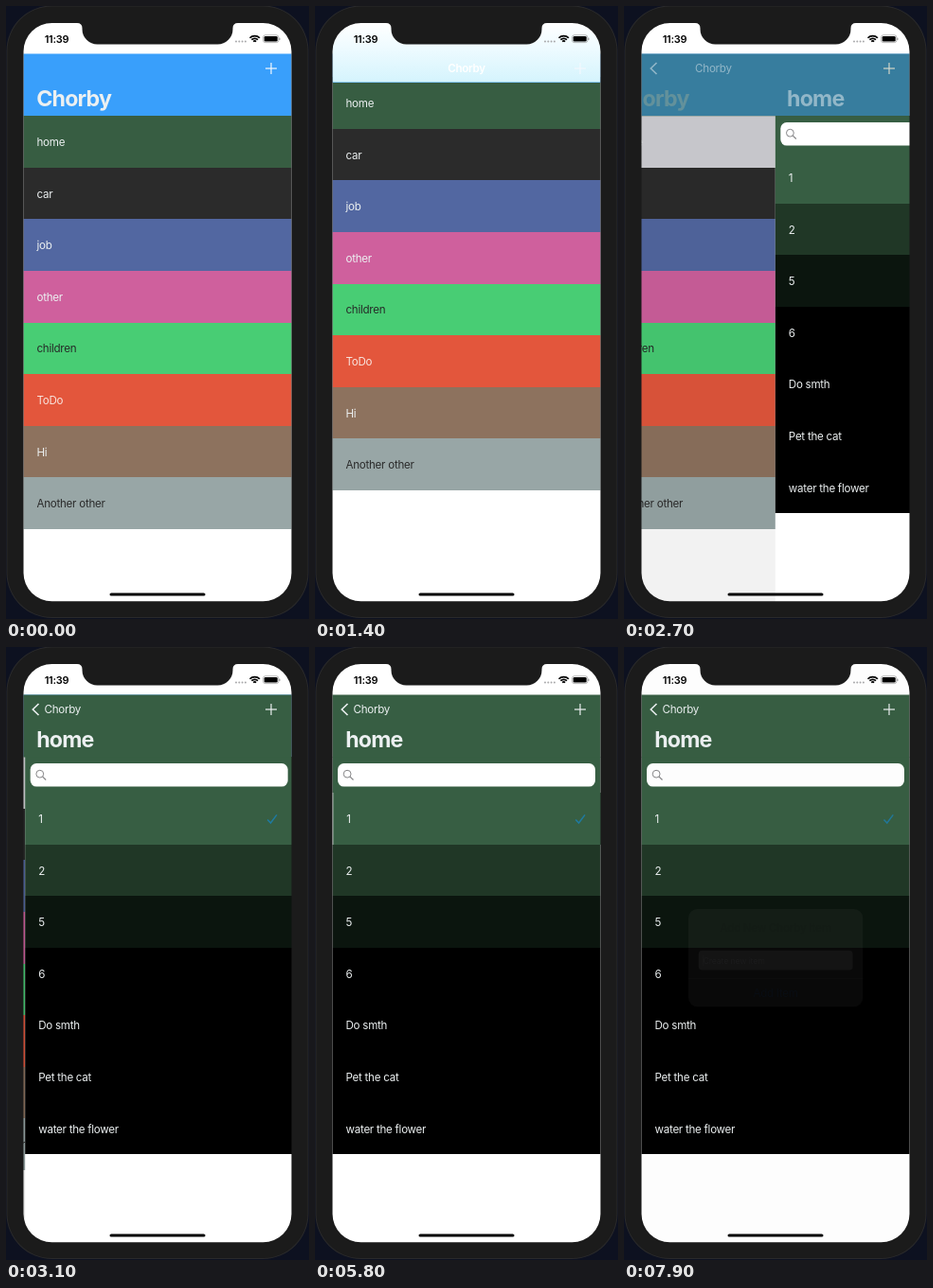
Recreate the animation shown at these times as an HTML page with a canvas. Size 320 by 648 pixels, loop 8 s.

```html
<!DOCTYPE html>
<html lang="en">
<head>
<meta charset="utf-8">
<title>To-do list demo</title>
<style>
html, body { margin: 0; width: 100%; height: 100%; overflow: hidden; background: #0d1120; }
canvas { display: block; width: 320px; height: 648px; }
</style>
</head>
<body>
<canvas id="stage"></canvas>
<script>
const LOOP = 8000, LEFT = 18.5, WIDTH = 283, ROW = 54.6;
const APP = 'Chorby', PALE = '#ecf0f1', GREEN = '#375e43';
const canvas = document.getElementById('stage');
const ctx = canvas.getContext('2d');
const ratio = window.devicePixelRatio || 1;
canvas.width = 320 * ratio;
canvas.height = 648 * ratio;

const lists = [
  ['home', '#375d42'], ['car', '#2b2b2b'], ['job', '#5267a1'], ['other', '#cf609d'],
  ['children', '#48cd74', '#262b28'], ['ToDo', '#e3563c', '#f8e4de'],
  ['Hi', '#8d725e'], ['Another other', '#98a6a6', '#2b2b2b']
];
const items = [
  ['1', GREEN], ['2', '#203726'], ['5', '#0b150e'], ['6', '#000'],
  ['Do smth', '#000'], ['Pet the cat', '#000'], ['water the flower', '#000']
];
const scrollKeys = [[250, 0], [900, 58], [1400, 41], [1850, -28], [2250, 0]];
const swipeKeys = [[4820, 0], [5200, -76], [5420, -66], [5790, 0.8], [6000, 0]];

const clamp = v => Math.max(0, Math.min(1, v));
const mix = (a, b, k) => a + (b - a) * k;

// Critically damped approach from 0 to 1
function spring(t, start, tau) {
  const u = Math.max(0, (t - start) / tau);
  return 1 - (1 + u) * Math.exp(-u);
}

function track(keys, t) {
  if (t <= keys[0][0]) return keys[0][1];
  for (let i = 1; i < keys.length; i++) {
    const [t0, a] = keys[i - 1], [t1, b] = keys[i];
    if (t < t1) return mix(a, b, (1 - Math.cos(Math.PI * (t - t0) / (t1 - t0))) / 2);
  }
  return keys[keys.length - 1][1];
}

function group(alpha, draw) {
  if (alpha <= 0) return;
  ctx.save();
  ctx.globalAlpha *= alpha;
  draw();
  ctx.restore();
}

function box(x, y, w, h, color, r = 0) {
  ctx.fillStyle = color;
  ctx.beginPath();
  ctx.roundRect(x, y, w, h, r);
  ctx.fill();
}

function line(color, width, points) {
  ctx.strokeStyle = color;
  ctx.lineWidth = width;
  ctx.beginPath();
  points.forEach(([x, y]) => ctx.lineTo(x, y));
  ctx.stroke();
}

// y is the middle of the capital letters
function text(str, x, y, color, size = 11.6, weight = 400, align = 'left') {
  ctx.font = `${weight} ${size}px Inter, Roboto, sans-serif`;
  ctx.letterSpacing = (size > 20 ? -0.035 : -0.023) * size + 'px';
  ctx.textAlign = align;
  ctx.fillStyle = color;
  ctx.fillText(str, x, y + size * 0.36);
}

function clipTo(x, y, w, h, draw) {
  ctx.save();
  ctx.beginPath();
  ctx.rect(x, y, w, h);
  ctx.clip();
  draw();
  ctx.restore();
}

// Row edges sit on whole pixels so that neighbours meet without a seam
function row([label, color, ink = PALE], x, y) {
  const edge = Math.round(y);
  box(x, edge, WIDTH, Math.round(y + ROW) - edge, color);
  text(label, x + 14, y + 27.6, ink);
}

function check(x, y, color) {
  line(color, 1.5, [[x - 5, y + 0.5], [x - 1.7, y + 4], [x + 4.8, y - 4.6]]);
}

function plus(color) {
  line(color, 1.2, [[274, 66], [286, 66]]);
  line(color, 1.2, [[280, 60], [280, 72]]);
}

function listTable(x, top, selected) {
  box(x, 50, WIDTH, 580, '#fff');
  lists.forEach((item, i) => row(i || !selected ? item : ['home', '#d1d1d6'], x, top + i * ROW));
}

function itemTable(t, x, alert) {
  box(x, 116, WIDTH, 514, '#fff');
  box(x, 116, WIDTH, 38, GREEN);
  box(x + 5.5, 123, 272, 24.6, '#fff', 6.5);
  ctx.strokeStyle = '#858587';
  ctx.lineWidth = 1;
  ctx.beginPath();
  ctx.arc(x + 15.6, 134.2, 3.9, 0, 7);
  ctx.stroke();
  line('#858587', 1.2, [[x + 18.5, 137.1], [x + 22, 140.5]]);

  const top = 154.2, swipe = track(swipeKeys, t);
  items.forEach((item, i) => {
    const y = top + i * ROW;
    if (i === 0 && swipe) {
      box(x, 154, WIDTH, 55, swipe < 0 ? '#ff3b30' : '#e4ebe6');
      if (swipe < 0) deleteAction(x + WIDTH + swipe, y);
    }
    row(item, x + (i ? 0 : swipe), y);
  });
  const mark = (cx, cy) => {
    group(1 - alert, () => check(cx, cy, '#1f7aa0'));
    group(alert, () => check(cx, cy, '#5d7d67'));
  };
  mark(x + 261 + swipe, 182);
  if (t >= 4100 && t < 4500) mark(x + 261, 236.6);
}

function deleteAction(x, y) {
  clipTo(x, y, 320, ROW, () => {
    const cx = x + 28;
    line('#fff', 1.3, [[cx - 7, y + 16], [cx + 7, y + 16]]);
    line('#fff', 1.3, [[cx - 2.5, y + 13.5], [cx + 2.5, y + 13.5]]);
    line('#fff', 1.3, [[cx - 5, y + 17], [cx - 4, y + 31], [cx + 4, y + 31], [cx + 5, y + 17]]);
    line('#fff', 1, [[cx, y + 19.5], [cx, y + 28.5]]);
    text('Delete', cx, y + 40, '#fff', 10.2, 400, 'center');
  });
}

function listBar(scroll, push) {
  const bottom = Math.max(80.5, 116.2 - scroll);
  const collapsed = clamp((scroll - 28) / 10);
  box(LEFT, 18, WIDTH, 32.5, '#fff');
  box(LEFT, 50.5, WIDTH, Math.round(bottom) - 50.5, '#399ffb');
  clipTo(LEFT, 78, WIDTH, bottom - 78, () => group(1 - push, () => {
    const size = 23.2 * (1 + Math.max(0, -scroll) * 0.001);
    text(APP, 32.2 - 85 * push, bottom - 18.5, PALE, size, 700);
  }));
  group(collapsed, () => {
    const fade = ctx.createLinearGradient(0, 18, 0, 80);
    fade.addColorStop(0, '#fff');
    fade.addColorStop(0.4, '#effbff');
    fade.addColorStop(1, '#d5f4fd');
    box(LEFT, 18, WIDTH, bottom - 18, fade);
    text(APP, 160, 66, '#fff', 11.6, 600, 'center');
  });
  plus('#f4f9fd');
}

function itemBar(push, alert) {
  const rest = 1 - Math.min(1, push * 1.01);
  group(1 - rest, () => {
    box(LEFT, 50.5, WIDTH, 66, GREEN);
    text('home', 32.2 + WIDTH * rest, 97.6, PALE, 23.2, 700);
    group(1 - 0.25 * alert, () => {
      line(PALE, 1.6, [[34.5, 60], [28.3, 66], [34.5, 72]]);
      text(APP, 40.5 + 70 * rest, 66, PALE);
      plus(PALE);
    });
  });
}

function statusBar() {
  text('11:39', 53.5, 35, '#000', 11, 600, 'center');
  for (let i = 0; i < 4; i++) box(242 + i * 3.3, 36.6, 2, 2, '#a9a9ab', 1);
  ctx.strokeStyle = '#000';
  ctx.lineWidth = 1.7;
  for (const r of [2, 4.7, 7.4]) {
    ctx.beginPath();
    ctx.arc(262.7, 39, r, -Math.PI * 0.75, -Math.PI * 0.25);
    ctx.stroke();
  }
  ctx.lineWidth = 0.6;
  ctx.strokeStyle = '#888';
  ctx.beginPath();
  ctx.roundRect(271.6, 30.8, 16.2, 7.8, 2.2);
  ctx.stroke();
  box(272.7, 31.9, 14, 5.6, '#000', 1.3);
  box(288.4, 33.5, 1, 2.5, '#888', 0.5);
}

function alertBox(scale) {
  ctx.translate(160, 328.5);
  ctx.scale(scale, scale);
  ctx.translate(-160, -328.5);
  box(68, 277, 184.3, 103.3, '#c5c7c6', 9.5);
  text(`Add New ${APP} Item`, 160, 297.3, '#000', 11.6, 600, 'center');
  box(78.7, 320.8, 163, 20.6, '#fff', 4);
  text('Create new item', 83.5, 331.3, '#c3c3c6', 8.9);
  box(83, 325.5, 0.8, 11.5, '#808084');
  box(68, 350, 184.3, 0.6, '#a7a9a8');
  text('Add Item', 160, 365.4, '#0a7aff', 11.6, 400, 'center');
}

// Fills everything around a rounded opening
function surround(color, x, y, w, h, r) {
  ctx.fillStyle = color;
  ctx.beginPath();
  ctx.rect(0, 0, 320, 648);
  ctx.roundRect(x, y, w, h, r);
  ctx.fill('evenodd');
}

function phoneBody() {
  surround('#1b1b1b', LEFT, 18, WIDTH, 611.2, 30);
  surround('#2a2a2b', 1.5, 0.5, 317, 645.5, 47);
  surround('#0d1120', 0.5, -0.5, 319, 647.5, 48);
  ctx.fillStyle = '#1b1b1b';
  ctx.beginPath();
  ctx.moveTo(75, 17);
  ctx.lineTo(75, 18);
  ctx.quadraticCurveTo(80.5, 18, 80.5, 23.5);
  ctx.arcTo(80.5, 40.5, 97, 40.5, 16);
  ctx.arcTo(239.5, 40.5, 239.5, 24, 16);
  ctx.lineTo(239.5, 23.5);
  ctx.quadraticCurveTo(239.5, 18, 245, 18);
  ctx.lineTo(245, 17);
  ctx.fill();
}

function render(t) {
  ctx.setTransform(ratio, 0, 0, ratio, 0, 0);
  const scroll = track(scrollKeys, t);
  const push = spring(t, 2580, 72);
  const pushing = push < 0.9995;
  const opened = spring(t, 6130, 85);
  const alert = opened * (1 - spring(t, 7150, 153));

  box(0, 0, 320, 648, '#fff');
  // Overdraw the sides; the phone body covers them
  ctx.save();
  ctx.translate(160, 0);
  ctx.scale(1, 1);
  ctx.translate(-160, 0);
  if (pushing) {
    listTable(LEFT - WIDTH * 0.3 * push, 116.2 - scroll, t >= 2400);
    box(LEFT, 116, WIDTH, 514, `rgba(0,0,0,${0.1 * push})`);
    listBar(scroll, push);
  }
  if (push > 0) {
    itemTable(t, LEFT + (pushing ? WIDTH * (1 - push) : 0), alert);
    itemBar(push, alert);
  }
  ctx.restore();
  statusBar();
  box(109.5, 620.4, 101, 3.2, '#000', 1.6);
  box(0, 0, 320, 648, `rgba(0,0,0,${0.2 * alert})`);
  group(alert, () => alertBox(mix(1.18, 1, opened)));
  phoneBody();
}

const begin = performance.now();
requestAnimationFrame(function loop() {
  render((performance.now() - begin) % LOOP);
  requestAnimationFrame(loop);
});
</script>
</body>
</html>
```
